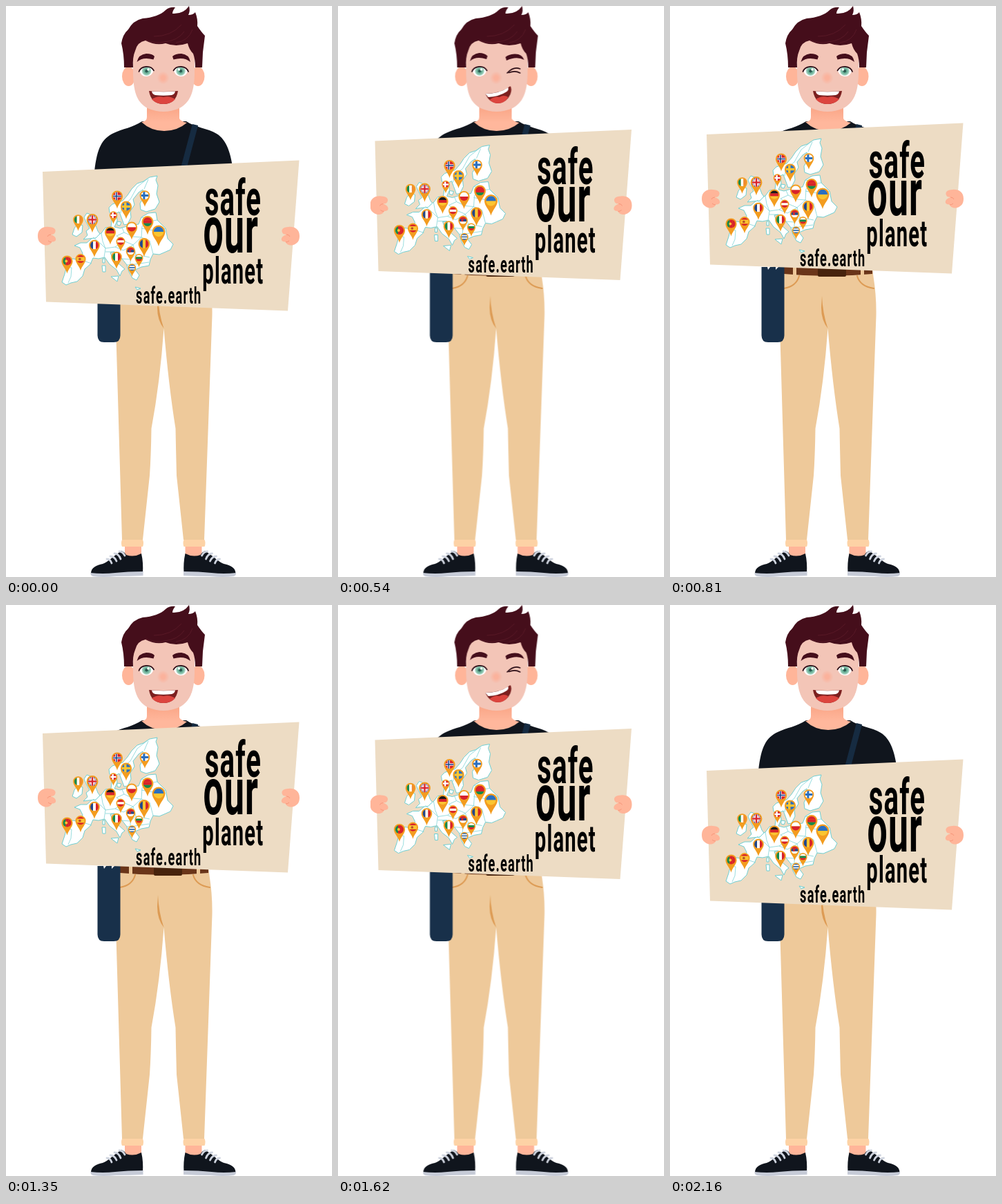
Animation of 472x827 px, one loop 2.43 s. Source, as an HTML page:

```html
<!DOCTYPE html>
<html lang="en">
<head>
<meta charset="utf-8">
<title>Safe our planet</title>
<style>
  html, body { margin: 0; width: 100%; height: 100%; overflow: hidden; background: #fff; }
  svg { display: block; width: 100%; height: 100%; }
  #all, #head, #board, .wink, .open { animation: 2430ms step-end infinite; }
  #all { animation-name: sway; --dx: .5px; }
  #head { animation-name: sway; --dx: 1px; }
  #board { animation-name: lift; }
  .wink { animation-name: wink; }
  .open { animation-name: open; }
  @keyframes sway {
    0%, 33.333%, 88.888% { transform: translate(0, 0); }
    11.111%, 66.666% { transform: translate(var(--dx), 0); }
  }
  @keyframes lift {
    0%, 88.888% { transform: translate(0, 0); }
    11.111%, 77.777% { transform: translate(0, -25.5px); }
    22.222%, 66.666% { transform: translate(0, -44.5px); }
    33.333%, 55.555% { transform: translate(0, -54px); }
    44.444% { transform: translate(0, -78px); }
  }
  @keyframes wink {
    0%, 33.333%, 88.888% { visibility: hidden; }
    11.111%, 66.666% { visibility: visible; }
  }
  @keyframes open {
    0%, 33.333%, 88.888% { visibility: visible; }
    11.111%, 66.666% { visibility: hidden; }
  }
  .skin { fill: #ffb599; }
  .hair { fill: #450e1b; }
  .dark { fill: #10151d; }
  .seam { fill: none; stroke: #dd9b54; stroke-width: 2; stroke-linecap: round; }
  .lash { fill: none; stroke: #2b0d16; stroke-width: 1.7; stroke-linecap: round; }
  .land { fill: #fff; stroke: #6fcfd2; stroke-width: 1; stroke-linejoin: round; }
  .border { fill: none; stroke: #7fd3d6; stroke-width: .8; }
  .sign { font: bold 73px Roboto, "Liberation Sans", sans-serif; letter-spacing: .03em; }
  .sign .big { font-size: 94px; }
  .sign .mid { font-size: 53px; }
  .sign .small { font-size: 33px; }
</style>
</head>
<body>
<svg viewBox="0 0 472 827" xmlns="http://www.w3.org/2000/svg">
  <defs>
    <radialGradient id="nose">
      <stop offset=".3" stop-color="#fbb29c"/>
      <stop offset="1" stop-color="#fbb29c" stop-opacity="0"/>
    </radialGradient>
    <linearGradient id="neck" x2="0" y2="1">
      <stop offset=".3" stop-color="#fba98b"/>
      <stop offset=".7" stop-color="#ffb79c"/>
    </linearGradient>
    <clipPath id="disc"><circle r="1"/></clipPath>
    <g id="shoe">
      <path class="skin" d="M172 780H196V798H172Z"/>
      <path fill="#fdd2a5" d="M168 773H198Q200 778 198 783H168Q166 778 168 773Z"/>
      <path class="dark" d="M123 822C123 813 131 810 140 808C148 805 153 799 159 795L167 789Q172 791 174 795Q185 799 196 793Q199 806 198 822Z"/>
      <path fill="#c6cbd7" d="M122.5 821Q140 823 158 821T198.500 819V825Q180 826 160 826Q140 828 126 826Q122 825 122.500 821Z"/>
      <path fill="none" stroke="#cfd4df" stroke-width="2.8" stroke-linecap="round" d="M146 801Q151 801 153 807M151 797Q157 797 160 804M157 793Q163 793 166 801M164 790Q169 790 172 796"/>
    </g>
    <g id="hand">
      <path class="skin" d="M46 333C46 323 54 319 62 320C70 320 73 324 71 328C70 331 66 331 64 331C70 332 73 336 72 339C71 342 67 341 66 342C64 347 58 347 55 346C49 344 46 340 46 333Z"/>
      <path fill="none" stroke="#f79679" d="M65 331Q61 331 60 334M66 342Q63 342 61 340"/>
    </g>
    <g id="eye">
      <path fill="#fff" d="M-10 0C-7 -8 6 -9 10 -1C8 5 4 7 -1 7C-6 7 -8 4 -10 0Z"/>
      <circle cy="-.8" r="6.6" fill="#9bcdb9"/>
      <circle cy="-.8" r="4.6" fill="#6db39b"/>
      <circle cy="-.8" r="2.2" fill="#2b5a50"/>
      <circle cx="2.500" cy="-3" r="1.700" fill="#fff"/>
      <path class="lash" d="M-11 0C-8 -8.500 6 -10 10.500 -1.500"/>
    </g>
  </defs>

  <g id="all">
    <use href="#shoe"/>
    <use href="#shoe" transform="matrix(-1 0 0 1 455.500 0)"/>
    <path fill="#eec99a" d="M166 380H293L294.5 392Q299 420 298.5 448L287 773H257L247 680Q246 640 245.500 612Q235.500 550 228.500 467Q223 545 210.500 612Q210 650 208 680L198 773H168L159.500 480Q158 425 166 380Z"/>
    <path class="seam" d="M165 409Q183 406 187 391M295 409Q275 406 271 391"/>
    <path fill="#dd9b54" d="M220 420Q221 445 228.500 467Q219 455 219 437Z"/>
    <path class="dark" d="M128 240C132 205 139 192 156 184C168 178 184 176 197 167H261C274 176 292 177 305 185C320 194 326 215 329 240L294 265L293 379H166L165 265Z"/>
    <path fill="#6a3519" d="M165 377H293V388Q228 394 165 388Z"/>
    <path fill="#eec99a" d="M178 377h5v13h-5zM276 377h5v13h-5z"/>
    <rect x="214" y="379" width="41" height="13" rx="2" fill="#47230d"/>
    <path fill="none" stroke="#162b41" stroke-width="8.5" d="M274 172L258 232Q228 315 150 383"/>
    <path fill="#18304a" d="M132.500 378H165.500V477Q165.500 487 156 487H142Q132.500 487 132.500 477Z"/>
    <path fill="#fff" d="M141 378H145L142 382ZM153 378H157L153 382Z"/>
    <path fill="url(#neck)" d="M204 138H251V163Q253 167 262 169Q248 181 229 181Q210 181 196 168Q204 167 204 161Z"/>

    <g id="head">
      <ellipse class="skin" cx="177.500" cy="102" rx="9.500" ry="14"/>
      <ellipse class="skin" cx="278" cy="102" rx="9.500" ry="14"/>
      <path fill="#f3c5b7" d="M184 42H273V100C272 126 266 140 251 148Q228 158 205 148C190 140 185 126 184 100Z"/>
      <path class="hair" d="M171 89Q171 70 167 54Q169 41 177 34Q184 21 198 18C212 17 224 13 231 6Q237 1 245 2Q241 7 241 11Q257 12 265 0Q267 7 264 13Q271 13 274 9Q278 19 277 29Q283 38 288 43L285 67L284 89H274Q274 77 271 69Q265 63 263 54Q246 60 231 54Q217 58 202 50Q190 52 187 65Q183 74 184 89Z"/>
      <path fill="none" stroke="#5d1c2a" stroke-width=".8" d="M202 49Q214 55 230 52Q249 50 258 37M214 44Q239 44 254 27M246 53Q264 51 270 34"/>
      <ellipse cx="227.500" cy="104" rx="9" ry="9.500" fill="url(#nose)"/>

      <g class="open">
        <path class="hair" d="M189.500 81Q192 70 203 69Q212 69 215 73L213.500 77.500Q198 73 189.500 81ZM267 81Q265 70 254 69Q245 69 241 73L242.500 77.500Q258 73 267 81Z"/>
        <use href="#eye" x="203.500" y="95"/>
        <use href="#eye" transform="matrix(-1 0 0 1 253 95)"/>
        <path fill="#7c2020" d="M207 123Q228 125 249 123Q246 142 228 142Q210 142 207 123Z"/>
        <path fill="#fff" d="M211 123.500Q228 125 245 123.500Q244 128 240 129Q228 130.500 216 129Q212 128 211 123.500Z"/>
        <path fill="#dc453f" d="M211 135Q219 129.500 228 132Q237 129.500 245 135Q239 142 228 142Q217 142 211 135Z"/>
      </g>
      <g class="wink" visibility="hidden">
        <path class="hair" d="M189.500 80Q192 69 203 68Q211 68 215 72.500L213.500 77Q198 72 189.500 80ZM268 78Q265 69 254 69.500Q245 70 241 74L242.500 79Q257 72 268 78Z"/>
        <use href="#eye" x="203.500" y="95"/>
        <path class="lash" d="M243.500 97Q253 87 262 91M246 96.500Q255 93 262 97"/>
        <path fill="#7c2020" d="M212 127Q234 127 248 116Q251 120 248 128Q243 140 230 141Q217 140 212 127Z"/>
        <path fill="#fff" d="M212 127Q232 127 245 118Q246 122 242 124.500Q232 131 216 132Z"/>
        <path fill="#dc453f" d="M218 136Q225 130 232 132Q239 128 245 132Q240 141 230 141Q223 141 218 136Z"/>
      </g>
    </g>

    <g id="board">
      <path fill="#eddcc4" d="M53 240L424.500 223.500L408 441.500L58 428.500Z"/>
      <g class="land">
        <path d="M219 246L208 248L199 254L190 257L182 265L176 274L169 282L154 287L149 292L150 299L156 302L164 298L167 306L171 317L176 316L181 306L180 297L186 288L184 280L192 270L198 266L201 274L194 286L195 295L203 298L216 294L222 284L218 272L220 260L217 252Z"/>
        <path d="M154 303L160 302L161 311L157 320L165 322L178 318L192 316L196 306L206 300L217 299L219 310L231 322L234 337L242 345L238 353L229 357L222 360L213 359L209 367L207 376L196 378L187 382L193 390L189 397L183 394L178 385L175 375L168 366L157 356L151 357L154 365L164 374L172 381L168 384L165 391L160 382L150 374L143 364L134 366L126 365L122 374L114 381L111 391L103 399L94 401L87 404L81 400L85 388L88 376L86 370L96 366L109 368L111 358L107 350L99 347L108 343L117 343L126 335L138 329L144 321L152 320Z"/>
        <path d="M117 300L125 303L124 311L130 318L133 326L136 330L130 336L119 337L112 338L118 332L116 326L121 322L116 313L113 306Z"/>
        <path d="M104 315L111 318L110 328L102 334L96 331L99 322Z"/>
        <path d="M152 392L163 391L161 399ZM139 376h5v9h-4zM140 366h3v6h-3zM187 407l8 2l-5 2zM161 312l6 1l-2 5l-4-1z"/>
      </g>
      <path class="border" d="M205 250L190 262L180 280L168 290L166 300M206 251L200 265M88 378L95 379L94 392L90 401M109 368L124 373M126 335L138 345L144 351L142 364M138 329L140 341L144 351L158 349L170 340L160 333L171 328L168 321M171 328L184 334L196 335L197 319L206 312L219 310M196 306L210 309M144 356L157 356M158 349L170 354L184 346L196 335L208 340L213 359M170 340L184 346L188 360L208 364M168 366L180 367L188 360M175 375L187 374L207 371M180 367V375M196 322L218 326L231 322"/>
      <g id="pins"></g>
      <g class="sign" transform="scale(.55 1)">
        <text x="523" y="303">safe</text>
        <text x="519" y="357" class="big">our</text>
        <text x="517" y="402" class="mid">planet</text>
        <text x="342" y="431" class="small">safe.earth</text>
      </g>
      <use href="#hand"/>
      <use href="#hand" transform="matrix(-1 0 0 1 471 0)"/>
    </g>
  </g>
</svg>
<script>
  const red = '#d8222b', blue = '#21468b', green = '#16894a', gold = '#fbc531', white = '#fff';
  const sky = '#2a6fc0', black = '#181818';
  const rect = (x, y, w, h, c) => `<rect x="${x}" y="${y}" width="${w}" height="${h}" fill="${c}"/>`;

  const rows = (...cs) => cs.map((c, i) => rect(-1, -1 + 2 * i / cs.length, 2, 2 / cs.length + .02, c)).join('');
  const cols = (...cs) => cs.map((c, i) => rect(-1 + 2 * i / cs.length, -1, 2 / cs.length + .02, 2, c)).join('');
  const bar = (c, w, x = 0) => rect(x - w / 2, -1, w, 2, c) + rect(-1, -w / 2, 2, w, c);
  const cross = (bg, c, inner) => rows(bg) + bar(c, .55, -.2) + (inner ? bar(inner, .26, -.2) : '');
  const union = rows(blue) +
    `<path d="M-1-1L1 1M1-1L-1 1" stroke="#fff" stroke-width=".4"/>
     <path d="M-1-1L1 1M1-1L-1 1" stroke="${red}" stroke-width=".13"/>` + bar(white, .62) + bar(red, .36);
  const badge = c => `<circle cx="-.2" r=".32" fill="${c}"/>`;

  // x, y, radius, flag
  const pins = [
    [161, 275.5, 7.5, cross(red, white, blue)],
    [201, 274.5, 6.8, cross(white, sky)],
    [174, 290.5, 7.5, cross(sky, gold)],
    [155.5, 303, 5.3, cross(red, white)],
    [104.5, 309.5, 6.8, cols(green, white, '#f08a30')],
    [125, 309.5, 7.8, union],
    [205, 312.5, 7.8, rows(red, red, green)],
    [182, 320.5, 7.5, rows(white, red)],
    [151, 327.5, 7.5, rows(black, red, gold)],
    [221, 327, 8.8, rows(sky, gold)],
    [166, 341, 6, rows(red, white, red)],
    [200, 344.5, 7.8, cols(blue, gold, red)],
    [128, 346.5, 7.2, cols(blue, white, red)],
    [180.5, 355, 6.3, rows(red, blue, white) + badge(red)],
    [160, 363.5, 7.2, cols(green, white, red)],
    [192.5, 365, 5.6, rows(white, green, red)],
    [108, 366.5, 7, rows(red, gold, gold, red) + badge('#b5532a')],
    [88.5, 369.5, 7.5, cols(green, red, red) + badge(gold)],
    [182.5, 379, 5.3, rows(sky, white, sky, white, sky)]
  ];

  document.getElementById('pins').innerHTML = pins.map(([x, y, r, flag]) =>
    `<g transform="translate(${x} ${y}) scale(${r})">
      <path fill="#f39c1f" d="M0 2.4C-.2 1.5-1.08 .8-1.08 0A1.08 1.08 0 0 1 1.08 0C1.08 .8 .2 1.5 0 2.4Z"/>
      <g transform="scale(.82)"><g clip-path="url(#disc)">${flag}</g></g>
    </g>`).join('');
</script>
</body>
</html>
```
